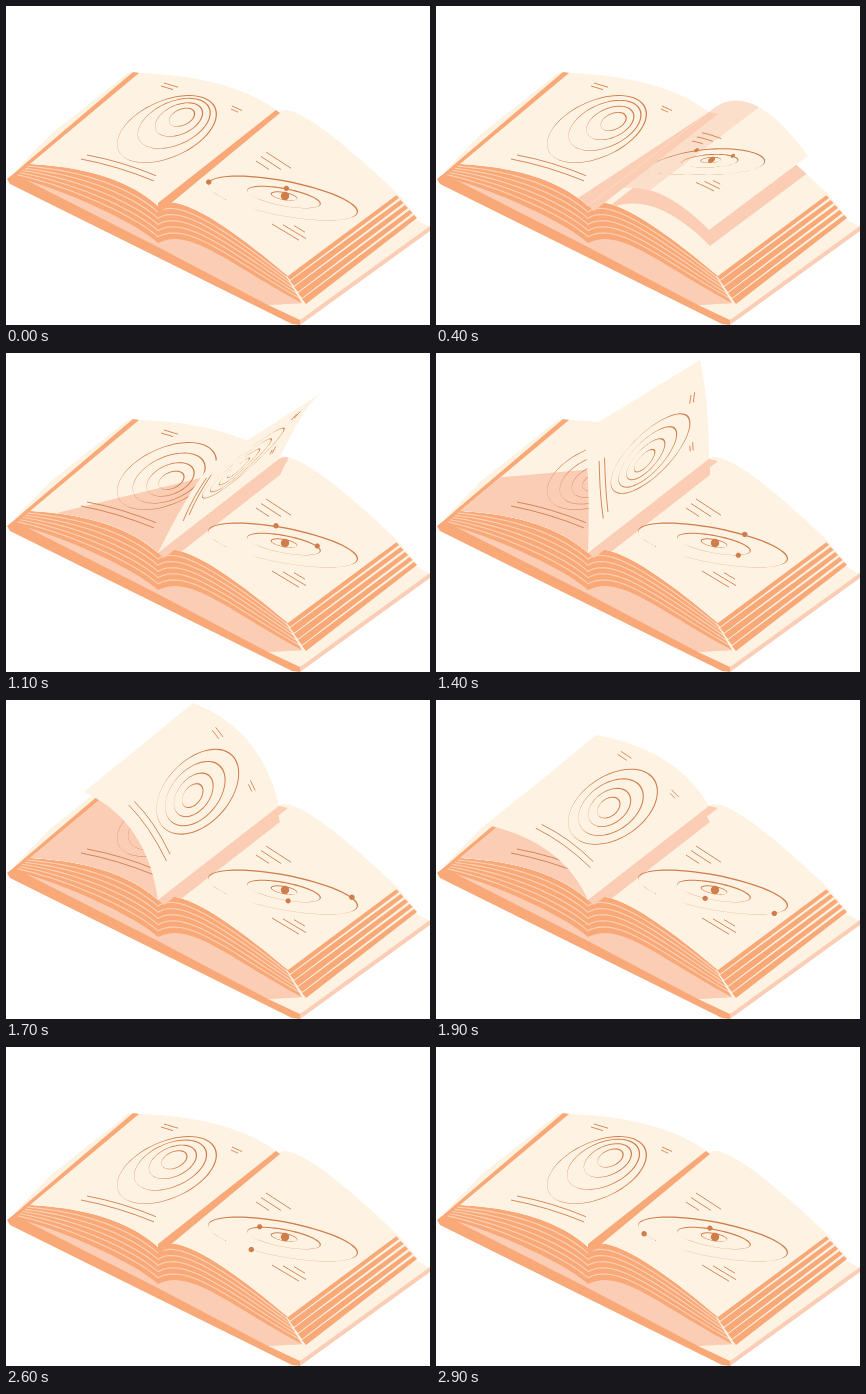
An HTML page with a canvas for the animation above (3 s loop, 424 px wide and 319 px high).

```html
<!DOCTYPE html>
<html>
<head>
<meta charset="utf-8">
<style>
  html, body { margin: 0; width: 100%; height: 100%; overflow: hidden; background: #fff; }
  canvas { display: block; }
</style>
</head>
<body>
<canvas id="stage" width="424" height="319"></canvas>
<script>
const ctx = document.getElementById('stage').getContext('2d');
const CREAM = '#fef3e2', ORANGE = '#f9a878', PEACH = '#fbcdb5', PALE = '#fcdfca', INK = '#d07d4c';
const LOOP = 3000, STEP = 100, LANDED = 2100, REVEAL = 600;
const SPINE = [152, 200], HINGE = [273, 106];

// Turning sheet: time, near corner, far corner, bulge of the paper.
const TURN = [
  [0, 282,270, 392,188, -28,-37],
  [400, 273,224, 372,150, -6,-39],
  [800, 264,170, 357,102, 3,-28],
  [1200, 187,90, 300,20, 3,-8],
  [1400, 148,78, 264,7, 3,-5],
  [1700, 78,92, 187,3, 17,-17],
  [LANDED, 24,158, 133,67, 15,-11]
];

const mix = (a, b, k) => a.map((v, i) => v + (b[i] - v) * k);
const add = (a, b) => [a[0] + b[0], a[1] + b[1]];
const pairs = list => Array.from({ length: list.length / 2 }, (_, i) => [list[2 * i], list[2 * i + 1]]);
const same = p => p;

function bezier([a, b, c, d], u) {
  const v = 1 - u;
  return [0, 1].map(i => v*v*v*a[i] + 3*v*v*u*b[i] + 3*v*u*u*c[i] + u*u*u*d[i]);
}
const curve = (pts, from = 0, to = 1) =>
  Array.from({ length: 25 }, (_, i) => bezier(pts, from + (to - from) * i / 24));

function pose(t) {
  const next = Math.max(1, TURN.findIndex(key => key[0] >= t));
  const a = TURN[next - 1], b = TURN[next];
  const [near, far, bulge] = pairs(mix(a, b, (t - a[0]) / (b[0] - a[0])).slice(1));
  const edge = (root, tip) =>
    [root, add(mix(root, tip, 1 / 3), bulge), add(mix(root, tip, 2 / 3), bulge), tip];
  return { near: edge(SPINE, near), far: edge(HINGE, far) };
}
const outline = (p, from, to) => [...curve(p.near, from, to), ...curve(p.far, from, to).reverse()];
const RIGHT = pose(0), LEFT = pose(LANDED);

// Carries a point from one pose of the sheet to another; squeeze pulls it towards the spine.
function warp(from, to, squeeze) {
  const side = (n, f, p) => (f[0] - n[0]) * (p[1] - n[1]) - (f[1] - n[1]) * (p[0] - n[0]);
  const at = (u, p) => side(bezier(from.near, u), bezier(from.far, u), p);
  return p => {
    let lo = 0, hi = 1;
    const start = Math.sign(at(0, p));
    for (let i = 0; i < 14; i++) {
      const mid = (lo + hi) / 2;
      if (Math.sign(at(mid, p)) === start) lo = mid; else hi = mid;
    }
    const n = bezier(from.near, lo), f = bezier(from.far, lo);
    const dx = f[0] - n[0], dy = f[1] - n[1];
    const v = ((p[0] - n[0]) * dx + (p[1] - n[1]) * dy) / (dx * dx + dy * dy);
    const u = lo * squeeze;
    return mix(bezier(to.near, u), bezier(to.far, u), v);
  };
}

function trace(pts) {
  pts.forEach((p, i) => i ? ctx.lineTo(...p) : ctx.moveTo(...p));
}
function fill(pts, color) {
  ctx.beginPath();
  trace(pts);
  ctx.fillStyle = color;
  ctx.fill();
}
function stroke(pts, color, width) {
  ctx.beginPath();
  trace(pts);
  ctx.strokeStyle = color;
  ctx.lineWidth = width;
  ctx.stroke();
}
function clipped(pts, paint) {
  ctx.save();
  ctx.beginPath();
  trace(pts);
  ctx.clip();
  paint();
  ctx.restore();
}

function onEllipse(x, y, a, b, tilt, angle) {
  const u = a * Math.cos(angle), v = b * Math.sin(angle);
  return [x + u * Math.cos(tilt) - v * Math.sin(tilt), y + u * Math.sin(tilt) + v * Math.cos(tilt)];
}

// A pen ring: the shifted hole makes the line swell on one side and thin out on the other.
function ring(map, x, y, a, b, tilt, dx, dy) {
  const loop = (cx, cy, cut) => Array.from({ length: 65 }, (_, i) =>
    map(onEllipse(cx, cy, a - cut, b - cut, tilt, i * Math.PI / 32)));
  ctx.beginPath();
  trace(loop(x, y, 0));
  trace(loop(x + dx, y + dy, 0.75));
  ctx.fillStyle = INK;
  ctx.fill('evenodd');
}

function dot(map, center, r) {
  fill(Array.from({ length: 17 }, (_, i) => map(onEllipse(...center, r, r, 0, i * Math.PI / 8))), INK);
}

// Parallel notes: each line starts one step further and has its own length.
function notes(map, start, step, dir, lengths, bend = 0) {
  lengths.forEach((length, i) => {
    const a = add(start, step.map(v => v * i)), b = add(a, dir.map(v => v * length));
    stroke([0, 0.25, 0.5, 0.75, 1].map(k =>
      map(add(mix(a, b, k), [0, -4 * bend * k * (1 - k)]))), INK, 0.9);
  });
}

function drawRings(map, t) {
  const w = t / LOOP * 2 * Math.PI;
  const drift = [6 + 11 * Math.cos(w - 0.6), -3 - 9 * Math.cos(w + 0.2)];
  for (const [size, pull] of [[1, 0], [0.73, 0.48], [0.48, 0.8], [0.26, 1]]) {
    const center = add([161, 123], drift.map(v => v * pull));
    ring(map, ...center, 53.2 * size, (28.6 + 5 * (1 - size)) * size, -0.42, -0.5, 0.2);
  }
  notes(map, [81, 149], [-6, 4], [1, 0.3], [69, 73], 2);
  notes(map, [158, 77], [-3, 3], [1, 0.3], [14, 12]);
  notes(map, [226, 100], [-1, 3], [1, 0.45], [10, 7]);
}

// Angle reached after a share of one turn at even speed, from the left end of the ellipse.
function angleAt(a, b, share) {
  const pace = x => Math.hypot(a * Math.sin(x), b * Math.cos(x));
  const step = Math.PI / 160;
  let total = 0, angle = Math.PI;
  for (let i = 0; i < 320; i++) total += pace(i * step);
  for (let left = total * (share % 1); left > 0; angle += step) left -= pace(angle);
  return angle;
}

function drawOrbits(map, t) {
  const turn = Math.max(0, t - REVEAL) / (LOOP - REVEAL);
  const outer = [277, 192, 76.3, 17.7, 0.188], inner = [278, 191, 37.5, 9, 0.188];
  ring(map, ...outer, -0.5, 0.5);
  ring(map, ...inner, -0.4, 0.4);
  ring(map, 278, 190, 13.5, 4, 0.188, 0.3, 0.3);
  dot(map, [279, 190], 4.2);
  dot(map, onEllipse(...outer, angleAt(76.3, 17.7, turn + 0.005)), 2.7);
  dot(map, onEllipse(...inner, angleAt(37.5, 9, turn + 0.25)), 2.6);
  notes(map, [260, 146], [-5, 4.5], [1, 0.65], [25, 20, 13]);
  notes(map, [266, 218], [11, 0.8], [1, 0.6], [27, 23, 11]);
}

function drawStack(top, bottom) {
  const edge = k => curve(top.map((p, i) => mix(p, bottom[i], k)));
  fill([...edge(0), ...edge(1).reverse()], ORANGE);
  for (let k = 1; k < 6; k++) stroke(edge(k / 6), '#fcd3b6', 1.1);
}

function drawCover() {
  fill(pairs([1,173, 20,158, 150,225, 300,298, 294,319, 286,318, 4,178]), ORANGE);
  fill(pairs([20,174, 25,160, 152,205, 270,260, 300,297, 262,299, 150,240]), PEACH);
  fill(pairs([262,299, 298,297, 400,208, 424,221, 294,314]), CREAM);
  fill(pairs([294,314, 424,220, 424,225, 294,319]), PEACH);
  fill(pairs([122,67, 134,67, 24,160, 8,166, 45,128]), CREAM);
  fill(pairs([127,66, 134,67, 26,160, 10,172, 2,173, 20,157]), ORANGE);
  drawStack(LEFT.near, pairs([152,237, 130,217, 60,184, 9,171]));
  drawStack(RIGHT.near, pairs([152,237, 185,220, 228,262, 298,298]));

  // Leaves seen from the side open up towards the far end.
  fill(pairs([280,270, 392,188, 411,211, 297,299]), CREAM);
  for (let k = 0; k < 5; k++) {
    const a = [280 + 4 * k, 269 + 6 * k], b = [390 + 4.5 * k, 189 + 5 * k];
    fill([a, b, add(b, [3, 3]), add(a, [4, 5])], ORANGE);
  }
}

// The shadow runs out along the near edge of the left page, then up its outer edge.
function drawLeftShade(t) {
  const reach = 0.7 * (t / 1000) ** 2, front = Math.min(reach, 1);
  const tip = mix(LEFT.near[3], LEFT.far[3], Math.min(1, Math.max(0, reach - 1)));
  fill([...curve(LEFT.near, 0, front), ...(reach > 1 ? [tip] : []), HINGE], PEACH);
}

function drawSheet(t) {
  const p = pose(t), shape = outline(p), rising = t < 1100;
  const squeeze = 1 - 0.14 * Math.sin(Math.PI * t / LANDED);
  fill(shape, rising && t >= REVEAL ? PALE : CREAM);
  if (rising) fill(outline(p, 0, 0.55), t < REVEAL ? PALE : CREAM);
  clipped(shape, () => rising
    ? drawOrbits(warp(RIGHT, p, squeeze), t + REVEAL)
    : drawRings(warp(LEFT, p, squeeze), t));
}

function draw(t) {
  const turning = t > 0 && t < LANDED;
  const left = outline(LEFT), right = outline(RIGHT);
  ctx.clearRect(0, 0, 424, 319);
  drawCover();
  fill(left, CREAM);
  fill(right, CREAM);
  if (turning) {
    clipped(left, () => drawLeftShade(t));
    clipped(right, () => fill(outline(pose(t)).map(p => add(p, [1, 16])), PEACH));
  }
  clipped(left, () => drawRings(same, t));
  if (!turning || t >= REVEAL) clipped(right, () => drawOrbits(same, t));
  const gutter = pairs([152,197, 270,104, 274,107, 158,203, 152,208]);
  if (turning) drawSheet(t);
  if (t < 1200 && turning || t >= 1200 && turning) {
    fill([SPINE, HINGE, add(HINGE, [9, 2]), add(SPINE, [6, 5])], PEACH);
  } else {
    fill(gutter, ORANGE);
  }
}

function frame() {
  draw(Math.floor(performance.now() % LOOP / STEP) * STEP);
  requestAnimationFrame(frame);
}
frame();
</script>
</body>
</html>
```
